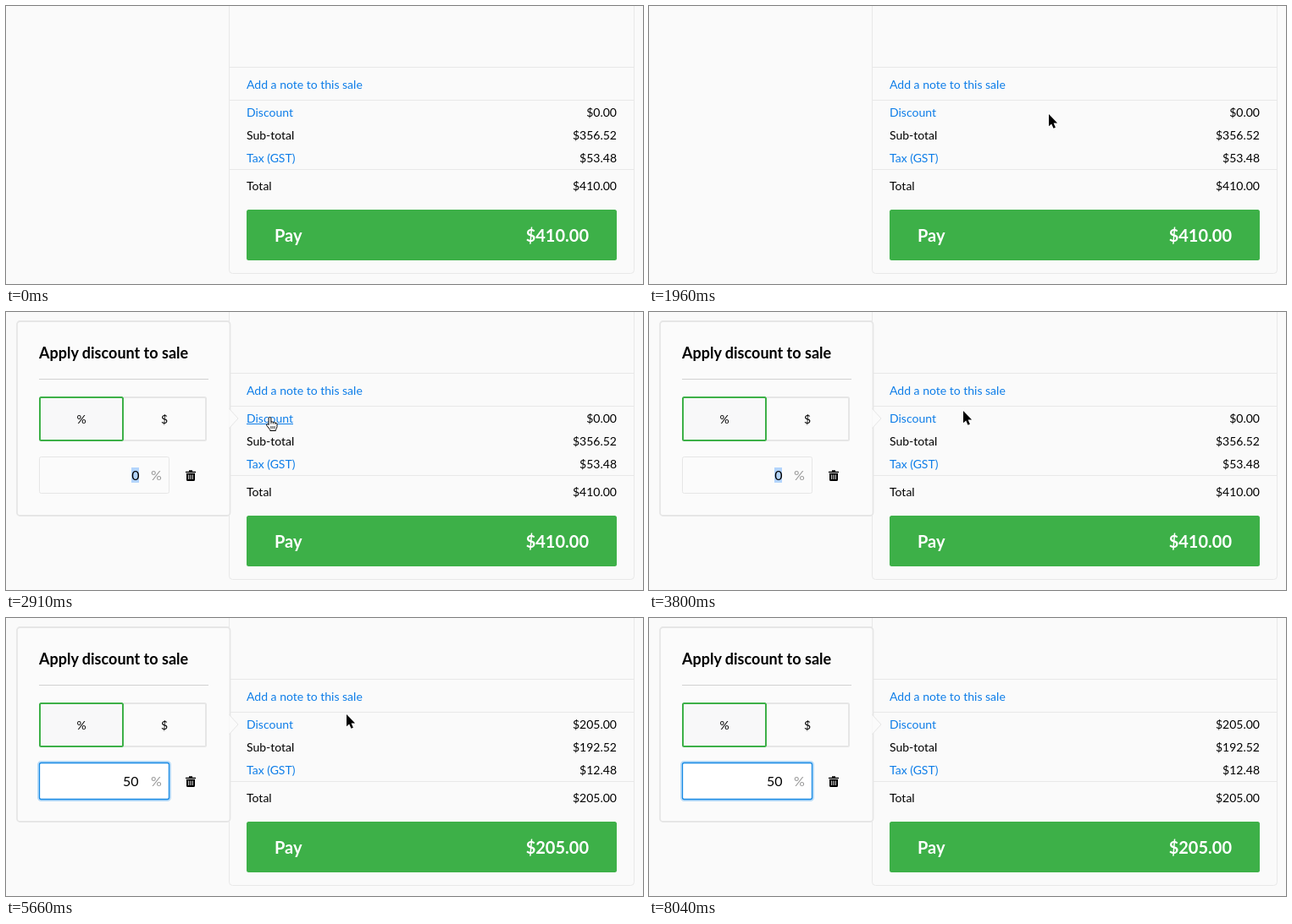
An HTML page that plays this animation: 752x329 px, repeating every 8.14 s.

```html
<!DOCTYPE html>
<html lang="en">
<head>
<meta charset="utf-8">
<title>Apply discount to sale</title>
<style>
  html, body { margin: 0; width: 100%; height: 100%; overflow: hidden; background: #fafafa; }
  svg { display: block; width: 100%; height: 100%; }
  text { font: 14px Lato, sans-serif; fill: #000; white-space: pre; }
  .link { fill: #0d7de8; }
  .end { text-anchor: end; }
  .mid { text-anchor: middle; }
  .pay { font-size: 20px; font-weight: 700; fill: #fff; }
  .title { font-size: 18px; font-weight: 700; }
  .field { font-size: 16px; }
  .line { fill: none; stroke: #e8e8e8; }
</style>
</head>
<body>
<svg viewBox="0 0 752 329">
  <rect width="752" height="329" fill="#fafafa"/>

  <g id="sale">
    <path class="line" d="M263.5 0V312.500q0 4 4 4H737.500q4 0 4-4V0M264 72.500H741M264 111.500H741M264 193.500H741"/>
    <text class="link" x="284" y="98">Add a note to this sale</text>
    <text class="link" x="284" y="131">Discount</text>
    <rect id="underline" x="284" y="132" width="55" height="1" fill="#0d7de8"/>
    <text x="284" y="158">Sub-total</text>
    <text class="link" x="284" y="185">Tax (GST)</text>
    <text x="284" y="218">Total</text>
    <text class="end" id="discount" x="721" y="131"></text>
    <text class="end" id="subtotal" x="721" y="158"></text>
    <text class="end" id="tax" x="721" y="185"></text>
    <text class="end" id="total" x="721" y="218"></text>
    <rect x="284" y="241" width="437" height="60" rx="2.500" fill="#3db048"/>
    <text class="pay" x="317" y="279">Pay</text>
    <text class="pay end" id="due" x="688" y="279"></text>
  </g>

  <g id="popup">
    <rect x="13" y="11" width="251.500" height="230" rx="3.500" fill="#fbfbfb" stroke="#e6e6e6" stroke-width="1.800"/>
    <path d="M263.500 114.500L274 126L263.500 137.500" fill="#fbfbfb" stroke="#e6e6e6"/>
    <text class="title" x="39" y="55">Apply discount to sale</text>
    <path d="M39 79.500H239" stroke="#d2d2d2"/>
    <path d="M139 101H234.500q1.500 0 1.500 1.500V150.500q0 1.500-1.500 1.500H139" fill="#fbfbfb" stroke="#e6e6e6" stroke-width="2"/>
    <rect x="40" y="101" width="98" height="51" rx="1.500" fill="#f8f8f9" stroke="#3db048" stroke-width="2"/>
    <text class="mid" x="89" y="132">%</text>
    <text class="mid" x="187" y="132">$</text>

    <rect x="39.500" y="171.500" width="153" height="43" rx="2" fill="#fbfbfb" stroke="#e6e6e6"/>
    <g id="focus" fill="none">
      <rect x="38.500" y="170.500" width="155" height="45" rx="3" stroke="#b9dcf8" stroke-width="3"/>
      <rect x="39.500" y="171.500" width="153" height="43" rx="2" fill="#fff" stroke="#1589e4" stroke-width="1.300"/>
    </g>
    <rect id="selection" x="148" y="184" width="9" height="18" fill="#b3d4fc"/>
    <text class="field end" id="percent" y="199"></text>
    <rect id="caret" x="155" y="184" width="1" height="18"/>
    <text class="field" x="171" y="199" style="fill:#999">%</text>

    <path d="M212 188.800H216V187.300H220V188.800H224V190.300H212ZM213 191H223V198.500q0 1.500-1.500 1.500H214.500q-1.500 0-1.500-1.500Z"/>
    <path d="M215.700 192.500V198M218 192.500V198M220.300 192.500V198" stroke="#fbfbfb" stroke-width=".9"/>
  </g>

  <g id="pointer" stroke-linejoin="round">
    <path id="arrow" d="M0 0V14.300L3.200 11.400L5.500 16.800L7.900 15.800L5.600 10.500H10.100Z" stroke="#fff" stroke-width="1.800" paint-order="stroke"/>
    <g id="hand" stroke="#000">
      <path d="M-1.900 9.500V1.900a1.400 1.400 0 0 1 2.800 0V6.200q1.300-.9 2.500.3 1.400-.6 2.400.6 2-.2 2.200 1.600V11.500q-.3 2-1.600 4V16.500H-.2V15.500L-4.200 10.300q-.8-1.600.8-1.800.8 0 1.500 1Z" fill="#fff"/>
      <path d="M.9 6.200V8.700M3.400 6.500V8.700M5.800 7.100V9M.9 11V14M3 11V14M5.100 11V14" stroke-width=".8"/>
    </g>
  </g>
</svg>

<script>
  const LOOP = 8140;
  const POPUP = 2910, FIRST_DIGIT = 4660, SECOND_DIGIT = 5160, BLUR = 8040;
  const $ = id => document.getElementById(id);
  const show = (id, on) => $(id).setAttribute('visibility', on ? 'visible' : 'hidden');
  const money = n => '$' + n.toFixed(2);

  // Each stroke of the pointer: [time, x, y]
  const strokes = [
    [[1200, 741, 178], [1520, 633, 148.500], [1760, 545, 132], [2010, 455, 127],
     [2200, 397, 124], [2420, 334, 123.500], [2550, 312, 123.500]],
    [[3380, 312, 123.500], [3420, 316, 123.500]],
    [[3580, 316, 123.500], [3800, 371, 117.500], [4030, 402, 114]],
    [[6150, 402, 114], [6320, 434, 107], [6570, 514, 120], [6850, 622, 147.500],
     [6960, 680, 162], [7140, 754, 172]]
  ];

  // Cubic interpolation through uneven times, at rest at both ends of a stroke
  function along(points, t) {
    const last = points.length - 1;
    if (t >= points[last][0]) return points[last].slice(1);
    const i = points.findIndex((p, n) => n < last && t < points[n + 1][0]);
    const a = points[i], b = points[i + 1], span = b[0] - a[0], u = (t - a[0]) / span;
    const slope = (n, axis) => {
      const p = points[Math.max(n - 1, 0)], q = points[Math.min(n + 1, last)];
      return (q[axis] - p[axis]) / (q[0] - p[0]) * span;
    };
    return [1, 2].map(k =>
      a[k] * (1 + 2 * u) * (1 - u) ** 2 + b[k] * u * u * (3 - 2 * u) +
      slope(i, k) * u * (1 - u) ** 2 - slope(i + 1, k) * u * u * (1 - u));
  }

  function drawPointer(t) {
    const stroke = strokes.filter(s => t >= s[0][0]).pop();
    const visible = Boolean(stroke) && t < 7140;
    const [x, y] = stroke ? along(stroke, t).map(Math.round) : [0, 0];
    const hover = visible && x < 340;
    $('pointer').setAttribute('transform', `translate(${x} ${y})`);
    show('arrow', visible && !hover);
    show('hand', hover);
    show('underline', hover);
  }

  function drawSale(percent) {
    const discount = 4.1 * percent, total = 410 - discount, tax = 53.48 - .82 * percent;
    const amounts = { discount, subtotal: total - tax, tax, total, due: total };
    for (const id in amounts) $(id).textContent = money(amounts[id]);
  }

  function drawField(t, percent) {
    const open = t >= POPUP, typed = t >= FIRST_DIGIT;
    const blinkStart = t < SECOND_DIGIT ? FIRST_DIGIT : SECOND_DIGIT;
    show('popup', open);
    show('selection', open && !typed);
    show('caret', typed && t < BLUR && (t - blinkStart) % 1000 < 500);
    $('focus').setAttribute('opacity', Math.min(1, Math.max(0, (t - FIRST_DIGIT) / 140)));
    $('percent').setAttribute('x', typed && t < BLUR ? 156.500 : 157.500);
    $('percent').textContent = percent;
  }

  function frame() {
    const t = performance.now() % LOOP;
    const percent = t < FIRST_DIGIT ? 0 : t < SECOND_DIGIT ? 5 : 50;
    drawSale(percent);
    drawField(t, percent);
    drawPointer(t);
    requestAnimationFrame(frame);
  }
  frame();
</script>
</body>
</html>
```
